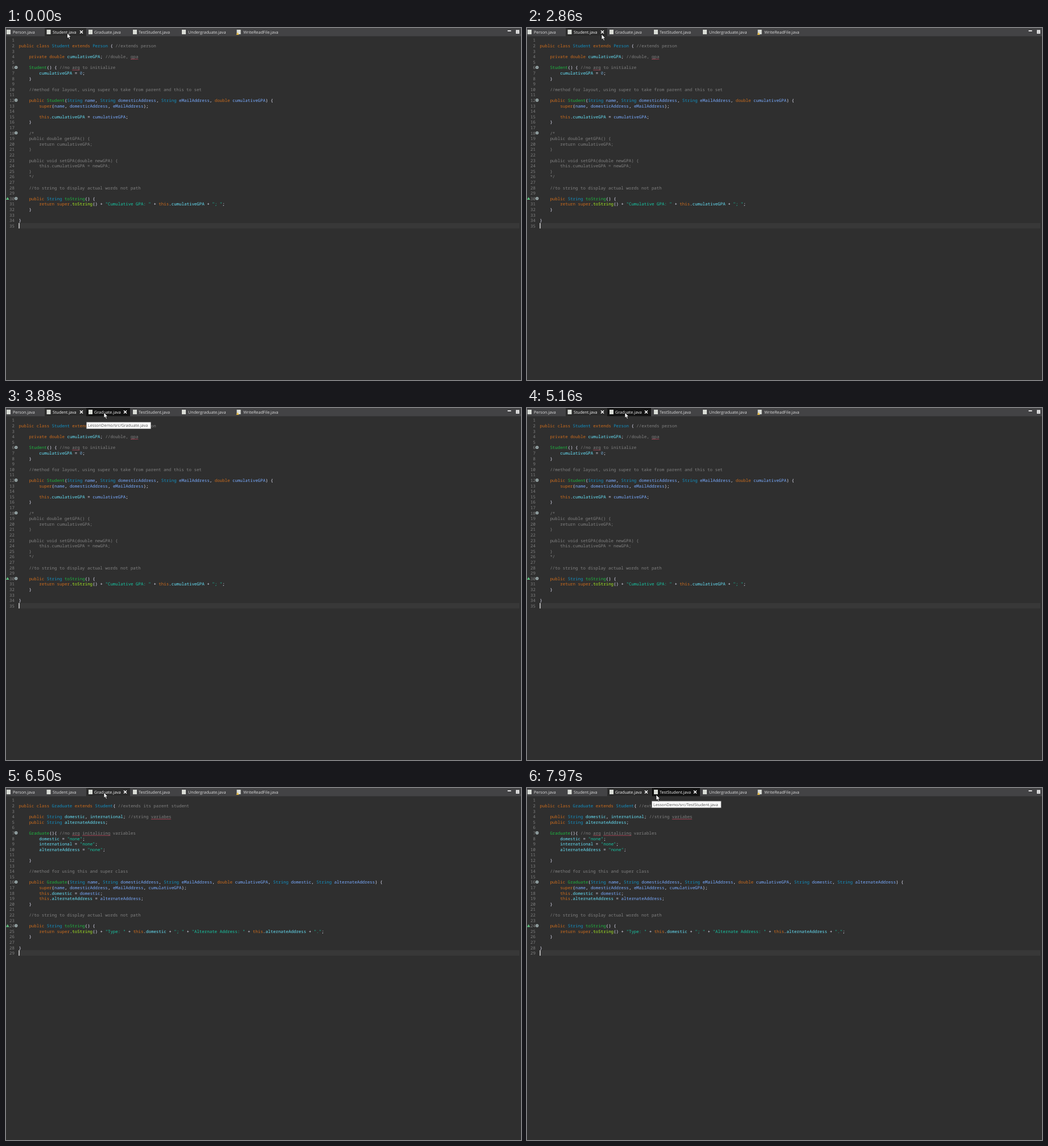
These frames come from a looping animation (905 by 619 pixels, 8000 ms). An HTML page with a canvas:

```html
<!DOCTYPE html>
<html lang="en">
<head>
<meta charset="utf-8">
<title>Code editor</title>
<style>
html, body { margin: 0; width: 100%; height: 100%; overflow: hidden; background: #2f2f2f; }
canvas { display: block; }
</style>
</head>
<body>
<canvas id="stage" width="905" height="619"></canvas>
<script>
const ctx = document.getElementById('stage').getContext('2d');
const LOOP = 8000, CHAR = 4.47, ROW = 9.6, LEFT = 22.5, TOP = 16.5;
const CODE_FONT = '7.45px "Noto Sans Mono", monospace';
const UI_FONT = '7.2px "Open Sans", sans-serif';

const studentFile = `
public class Student extends Person { //extends person

    private double cumulativeGPA; //double, gpa

    Student() { //no arg to initialize
        cumulativeGPA = 0;
    }

    //method for layout, using super to take from parent and this to set

    public Student(String name, String domesticAddress, String eMailAddress, double cumulativeGPA) {
        super(name, domesticAddress, eMailAddress);

        this.cumulativeGPA = cumulativeGPA;
    }

    /*
    public double getGPA() {
        return cumulativeGPA;
    }

    public void setGPA(double newGPA) {
        this.cumulativeGPA = newGPA;
    }
    */

    //to string to display actual words not path

    public String toString() {
        return super.toString() + "Cumulative GPA: " + this.cumulativeGPA + "; ";
    }

}
`;
const graduateFile = `
public class Graduate extends Student{ //extends its parent student

    public String domestic, international; //string variabes
    public String alternateAddress;

    Graduate(){ //no arg initalizing variables
        domestic = "none";
        international = "none";
        alternateAddress = "none";

    }

    //method for using this and super class

    public Graduate(String name, String domesticAddress, String eMailAddress, double cumulativeGPA, String domestic, String alternateAddress) {
        super(name, domesticAddress, eMailAddress, cumulativeGPA);
        this.domestic = domestic;
        this.alternateAddress = alternateAddress;
    }

    //to string to display actual words not path

    public String toString() {
        return super.toString() + "Type: " + this.domestic + "; " + "Alternate Address: " + this.alternateAddress + ".";
    }

}
`;

// Each tab: label, left edge, right edge, icon x, text x
const tabs = [
  ['Person.java', 0, 68, 1, 12],
  ['Student.java', 68, 141, 71.5, 82],
  ['Graduate.java', 141, 218, 145, 155],
  ['TestStudent.java', 219, 304, 223, 233],
  ['Undergraduate.java', 305, 400, 309, 320],
  ['WriteReadFile.java', 400, 492, 405.5, 417]
];

// Pointer steps: time, x, y
const pointer = [
  [0, 107.5, 9], [2560, 108.5, 9], [2710, 117, 10], [2860, 131, 11],
  [3010, 146, 13], [3130, 153, 14], [3250, 156, 14], [3370, 158, 13],
  [3490, 161, 12], [3640, 166, 10], [3760, 170, 8], [3880, 172, 8],
  [7400, 181, 8], [7520, 186, 8], [7670, 199, 10], [7820, 206, 11], [7970, 227, 12]
];
const caretToggles = [250, 780, 1280, 1810, 2310, 2860, 3370, 3880, 4380, 4910, 5470, 5470, 6000, 6500, 7000, 7520];

function rect(x, y, w, h, color) {
  ctx.fillStyle = color;
  ctx.fillRect(x, y, w, h);
}

function text(str, x, y, color, font) {
  ctx.font = font;
  ctx.fillStyle = color;
  ctx.fillText(str, x, y);
}

function polygon(points, color) {
  ctx.beginPath();
  points.forEach(([x, y]) => ctx.lineTo(x, y));
  ctx.closePath();
  ctx.fillStyle = color;
  ctx.fill();
}

function tokenColor(word, line, at) {
  const before = line[at - 1], after = line[at + word.length];
  if (/^\/[/*]/.test(word)) return '#808080';
  if (word[0] === '"') return '#17c6a3';
  if (/^\d/.test(word)) return '#6897bb';
  if (/^(public|private|class|extends|double|super|this|return)$/.test(word)) return '#cc6c1d';
  if (word === 'toString') return before === '.' ? '#a7ec21' : '#1eb540';
  if (/^(String|Person|Student|Graduate)$/.test(word)) return after === '(' ? '#1eb540' : '#1290c3';
  if (!/^\w/.test(word)) return '#e6e6fa';
  const isParam = before !== '.' && /\w\(String|super\(|this\.\w+ =/.test(line);
  return isParam ? '#79abff' : '#66e1f8';
}

function squiggle(x, y, width) {
  ctx.beginPath();
  for (let i = 0; i <= width; i++) ctx.lineTo(x + i, y + (i % 2 ? 0.6 : -0.6));
  ctx.strokeStyle = '#b4485c';
  ctx.lineWidth = 0.8;
  ctx.stroke();
}

function drawCode(source, caretOn) {
  const lines = source.split('\n');
  const lastTop = TOP + (lines.length - 1) * ROW;
  rect(23, lastTop, 879, ROW, '#383838');
  let inBlock = false;
  lines.forEach((line, i) => {
    const y = TOP + i * ROW + 7.8, number = String(i + 1);
    text(number, 15 - number.length * CHAR, y, '#808080', CODE_FONT);

    if (line.includes('/*')) inBlock = true;
    const pattern = inBlock ? /\S.*/g : /\/\/.*|"[^"]*"|\w+|[^\w\s]/g;
    for (const { 0: word, index } of line.matchAll(pattern)) {
      const color = inBlock ? '#808080' : tokenColor(word, line, index);
      text(word, LEFT + index * CHAR, y, color, CODE_FONT);
    }
    for (const { 0: word, index } of line.matchAll(/\b(gpa|arg|variabes|initalizing)\b/g))
      squiggle(LEFT + index * CHAR, y + 1.6, word.length * CHAR);

    const foldable = line.includes('/*') || /^    (public )?(\w+ )?\w+\(.*\{/.test(line) && !inBlock;
    if (foldable) {
      ctx.beginPath();
      ctx.arc(17.7, y - 3, 2.8, 0, 7);
      ctx.fillStyle = '#97a5a6';
      ctx.fill();
      rect(16.5, y - 3.4, 2.4, 0.8, '#5a6668');
    }
    if (line.includes('String toString'))
      polygon([[0, y - 0.6], [2.7, y - 5.5], [5.6, y - 0.6]], '#5fbf7f');
    if (line.includes('*/')) inBlock = false;
  });
  if (caretOn) rect(22.4, lastTop, 1.2, ROW, '#fff');
}

function drawClose(x, color) {
  ctx.beginPath();
  ctx.moveTo(x - 2.5, 4.5); ctx.lineTo(x + 2.5, 9.5);
  ctx.moveTo(x + 2.5, 4.5); ctx.lineTo(x - 2.5, 9.5);
  ctx.strokeStyle = color;
  ctx.lineWidth = 1.5;
  ctx.stroke();
}

function drawTabs(active, hovered, closeHot) {
  rect(0, 0, 905, 14.5, '#434345');
  tabs.forEach(([label, left, right, iconX, textX], i) => {
    const open = i === active || i === hovered;
    if (open) rect(left, 0, right - left, 14.5, i === active ? '#2b2b2b' : '#121212');
    rect(iconX, 3, 7, 8, '#d9dcd6');
    text(label, textX, 9.7, open ? '#f4f4f4' : '#dcdcdc', UI_FONT);
    if (open) drawClose(right - 8.5, closeHot && i === active ? '#e0705f' : '#fff');
  });
  polygon([[404.5, 12], [407, 7.5], [409.5, 12]], '#e8bd45');
  rect(881.5, 4, 6, 2, '#e6e6e6');
  rect(896, 3.5, 6, 6.5, '#e6e6e6');
  rect(897, 5.8, 4, 3.2, '#c9c9c9');
}

function drawTooltip(label, x, y, width) {
  rect(x, y, width, 12.5, '#767676');
  rect(x + 0.8, y + 0.8, width - 1.6, 10.9, '#fff');
  text('LessonDemo/src/' + label, x + 3, y + 8.8, '#505050', UI_FONT);
}

function drawPointer(x, y) {
  const shape = [[0, 0], [0, 9.6], [2.2, 7.5], [3.8, 11.2], [5.5, 10.4], [3.9, 6.9], [6.9, 6.9]];
  polygon(shape.map(([px, py]) => [x + px, y + py]), '#fff');
  ctx.strokeStyle = '#000';
  ctx.lineWidth = 0.7;
  ctx.stroke();
}

function draw(t) {
  const switched = t >= 5470;
  const caretOn = caretToggles.filter(at => at <= t).length % 2 === 0;
  const [, x, y] = pointer.findLast(([at]) => at <= t);
  const hovered = t >= 7970 ? 3 : t >= 3010 && !switched ? 2 : -1;

  ctx.textRendering = 'geometricPrecision';
  rect(0, 0, 905, 619, '#2f2f2f');
  drawCode(switched ? graduateFile : studentFile, caretOn);
  drawTabs(switched ? 2 : 1, hovered, t >= 7820 && t < 7970);
  if (t >= 3130 && t < 5160) drawTooltip('Graduate.java', 141, 24.5, 114);
  if (t >= 7970) drawTooltip('TestStudent.java', 219, 22.7, 122.5);
  drawPointer(x, y);
}

const start = performance.now();
function tick() {
  draw((performance.now() - start) % LOOP);
  requestAnimationFrame(tick);
}
tick();
</script>
</body>
</html>
```
